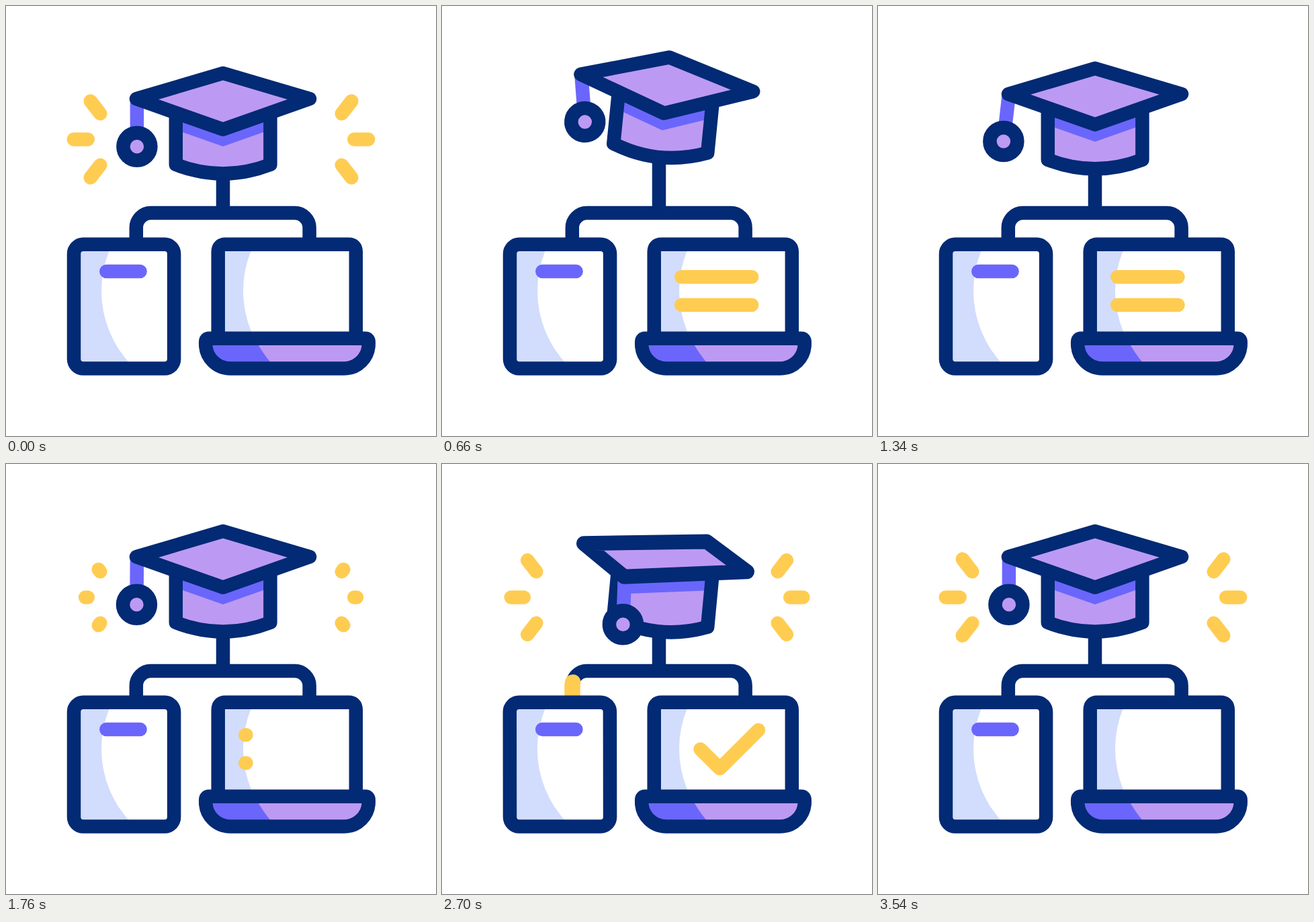
These frames come from a looping animation (640 by 640 pixels, 3600 ms). An HTML page:

```html
<!DOCTYPE html>
<html lang="en">
<head>
<meta charset="utf-8">
<title>Online learning</title>
<style>
  html, body { margin: 0; width: 100%; height: 100%; overflow: hidden; background: #fff; }
  svg { display: block; width: 100vw; height: 100vh; }
  .navy, .gold, .violet, .pulse {
    fill: none; stroke: #032a74; stroke-width: 20.5;
    stroke-linecap: round; stroke-linejoin: round;
  }
  .butt { stroke-linecap: butt; }
  .gold, .pulse { stroke: #ffcc52; }
  .pulse { stroke-width: 23.5; }
  .violet { stroke: #6b66fb; }
  .lilac-fill { fill: #bc9af3; }
  .violet-fill { fill: #6b66fb; }
  .sky-fill { fill: #d2dcfd; }
  .white-fill { fill: #fff; }
</style>
</head>
<body>
<svg viewBox="0 0 640 640">
  <defs>
    <clipPath id="paperClip"><rect x="101" y="355" width="149.3" height="184.5"/></clipPath>
    <clipPath id="screenClip"><rect x="315.7" y="355" width="205" height="140"/></clipPath>
    <clipPath id="bodyClip"><path id="bodyMask" d="M252.8 155V236Q323 263 393.4 236V155Z"/></clipPath>
    <clipPath id="baseClip"><path d="M297 495H539.5V503A36.5 36.5 0 0 1 503 539.5H333.5A36.5 36.5 0 0 1 297 503Z"/></clipPath>
  </defs>

  <g id="rays"></g>

  <path class="navy butt" d="M323 225V308M193.8 352V330A22 22 0 0 1 215.8 308H429.6A22 22 0 0 1 451.6 330V352"/>
  <path id="toPaper" class="pulse" pathLength="1" d="M451.6 350V330A22 22 0 0 0 429.6 308.5H215.8A22 22 0 0 0 194 330V350"/>
  <path id="toCap" class="pulse" pathLength="1" d="M194 350V330A22 22 0 0 1 215.8 308.5H322.8V245"/>

  <g id="paper">
    <rect class="white-fill" x="101" y="355" width="149.3" height="184.5"/>
    <g clip-path="url(#paperClip)">
      <rect class="sky-fill" x="101" y="355" width="110" height="185"/>
      <circle class="white-fill" cx="301" cy="424" r="159"/>
    </g>
    <rect class="navy" x="101" y="354.8" width="149.1" height="184.7" rx="14"/>
    <path class="violet" d="M149.3 395H199.6"/>
  </g>

  <g id="laptop">
    <rect class="white-fill" x="315.7" y="355" width="205" height="140"/>
    <g clip-path="url(#screenClip)">
      <rect class="sky-fill" x="315" y="355" width="80" height="140"/>
      <circle class="white-fill" cx="511" cy="424" r="158"/>
    </g>
    <path id="lines" class="gold"/>
    <path id="check" class="gold" pathLength="1" d="M384.5 424.5L413.5 453.3L471 396"/>
    <path class="navy butt" d="M315.7 495V366Q315.7 354.8 326.7 354.8H509.8Q520.8 354.8 520.8 366V495"/>
    <g clip-path="url(#baseClip)">
      <rect class="lilac-fill" x="290" y="490" width="255" height="55"/>
      <path class="violet-fill" d="M290 490H368Q380 516 402 540H290Z"/>
    </g>
    <path class="navy" d="M302 494.8H534.7Q539.7 494.8 539.7 500V503A36.5 36.5 0 0 1 503 539.5H333.7A36.5 36.5 0 0 1 297.2 503V500Q297.2 494.8 302 494.8Z"/>
  </g>

  <g id="cap">
    <path id="bodyFill" class="lilac-fill" d="M252.8 155V236Q323 263 393.4 236V155Z"/>
    <g clip-path="url(#bodyClip)"><polygon id="shade" class="violet-fill"/></g>
    <path id="bodyLine" class="navy butt" d="M252.8 155V236Q323 263 393.4 236V155"/>
    <path id="strap" class="violet butt"/>
    <polygon id="board" class="navy" style="fill:#bc9af3"/>
    <circle id="ring" class="navy" r="20.5" style="fill:#bc9af3"/>
  </g>
</svg>
<script>
const LOOP = 3600, AXIS = 323, STRAP = 71;
const $ = id => document.getElementById(id);
const set = (id, name, value) => $(id).setAttribute(name, value);
const show = (id, on) => { $(id).style.display = on ? "" : "none"; };

const ease = p => p * p * (3 - 2 * p);

// Eased 0 to 1, beginning at start.
const ramp = (t, start, span) => ease(Math.min(Math.max((t - start) / span, 0), 1));

// Eased rocking through 0, 1, -1, 1 ... 0, one step at a time.
function rock(t, start, step, count) {
  const key = i => i <= 0 || i >= count ? 0 : i % 2 ? 1 : -1;
  const p = (t - start) / step, i = Math.floor(p);
  return key(i) + (key(i + 1) - key(i)) * ease(p - i);
}

// Board corners in the order left, front, right, back.
const rest = [[194, 138.2], [323, 183.6], [452, 138.2], [323, 100]];
const turned = [[271, 167.8], [454, 160.3], [394, 115.5], [211, 118.2]];
const flipped = [2, 1, 0, 3].map(i => [2 * AXIS - turned[i][0], turned[i][1]]);

// Parabola through flipped (-1), rest (0) and turned (1).
const corners = u => rest.map((corner, i) => corner.map((v, k) => {
  const a = turned[i][k], b = flipped[i][k];
  return v + u * (a - b) / 2 + u * u * ((a + b) / 2 - v);
}));

function trim(id, from, to) {
  show(id, to - from > 0.001);
  set(id, "stroke-dasharray", `${Math.max(to - from, 0)} 3`);
  set(id, "stroke-dashoffset", -from);
}

function drawCap(t) {
  const lift = 25.3 * (ramp(t, 900, 680) - ramp(t, 60, 680));
  const tilt = 5.8 * rock(t, 300, 340, 3);
  const turn = rock(t, 1800, 300, 4);
  const swing = 6.5 * rock(t, 360, 490, 3) - 16.5 * rock(t, 1800, 300, 3)
    - 2 * (ramp(t, 2400, 300) - ramp(t, 3100, 300));

  set("cap", "transform", `translate(0 ${lift}) rotate(${tilt} ${AXIS} 258)`);
  for (const id of ["bodyFill", "bodyLine", "bodyMask"]) {
    set(id, "transform", `rotate(${5.4 * turn} ${AXIS} 258)`);
  }

  const pts = corners(turn);
  set("board", "points", pts.join(" "));
  set("board", "style", `fill:#bc9af3;stroke-width:${20.5 + 1.5 * Math.abs(turn)}`);
  set("shade", "points", pts.map(([x, y]) => [x, y + 25.5]).join(" "));

  // Adding the tilt keeps the tassel hanging straight down.
  const angle = (swing + tilt) * Math.PI / 180;
  const x = pts[0][0] + 0.9, y = pts[0][1];
  const rx = x + STRAP * Math.sin(angle), ry = y + STRAP * Math.cos(angle);
  set("strap", "d", `M${x} ${y}L${rx} ${ry}`);
  set("ring", "cx", rx);
  set("ring", "cy", ry);
}

function drawRays(t) {
  const reach = 1 - ramp(t, 0, 400) + ramp(t, 1600, 600) - ramp(t, 2660, 220) + ramp(t, 2880, 440);
  show("rays", reach > 0.001);
  let html = "";
  for (const side of [-1, 1]) {
    for (const k of [-1, 0, 1]) {
      const x = 320 + side * (198.2 - 18.5 * Math.abs(k)), y = 198.5 + 38.3 * k;
      const dx = side * (k ? 14.5 : 21) * reach, dy = 18.6 * k * reach;
      html += `<path class="gold" d="M${x} ${y}l${dx} ${dy}"/>`;
    }
  }
  $("rays").innerHTML = html;
}

function drawScreen(t) {
  const width = 105 * (ramp(t, 0, 600) - ramp(t, 1200, 600));
  show("lines", width > 0.1);
  set("lines", "d", `M356.2 403.3h${width}M356.2 445h${width}`);
  trim("check", ramp(t, 3220, 310), ramp(t, 1780, 310));
}

function draw(t) {
  drawCap(t);
  drawRays(t);
  drawScreen(t);
  set("paper", "transform", `rotate(${4 * rock(t, 2400, 200, 4)} 175.5 548)`);
  trim("toPaper", ramp(t, 2200, 605), ramp(t, 1800, 390));
  trim("toCap", ramp(t, 2980, 540), ramp(t, 2700, 350));
}

function tick() {
  draw(performance.now() % LOOP);
  requestAnimationFrame(tick);
}
tick();
</script>
</body>
</html>
```
